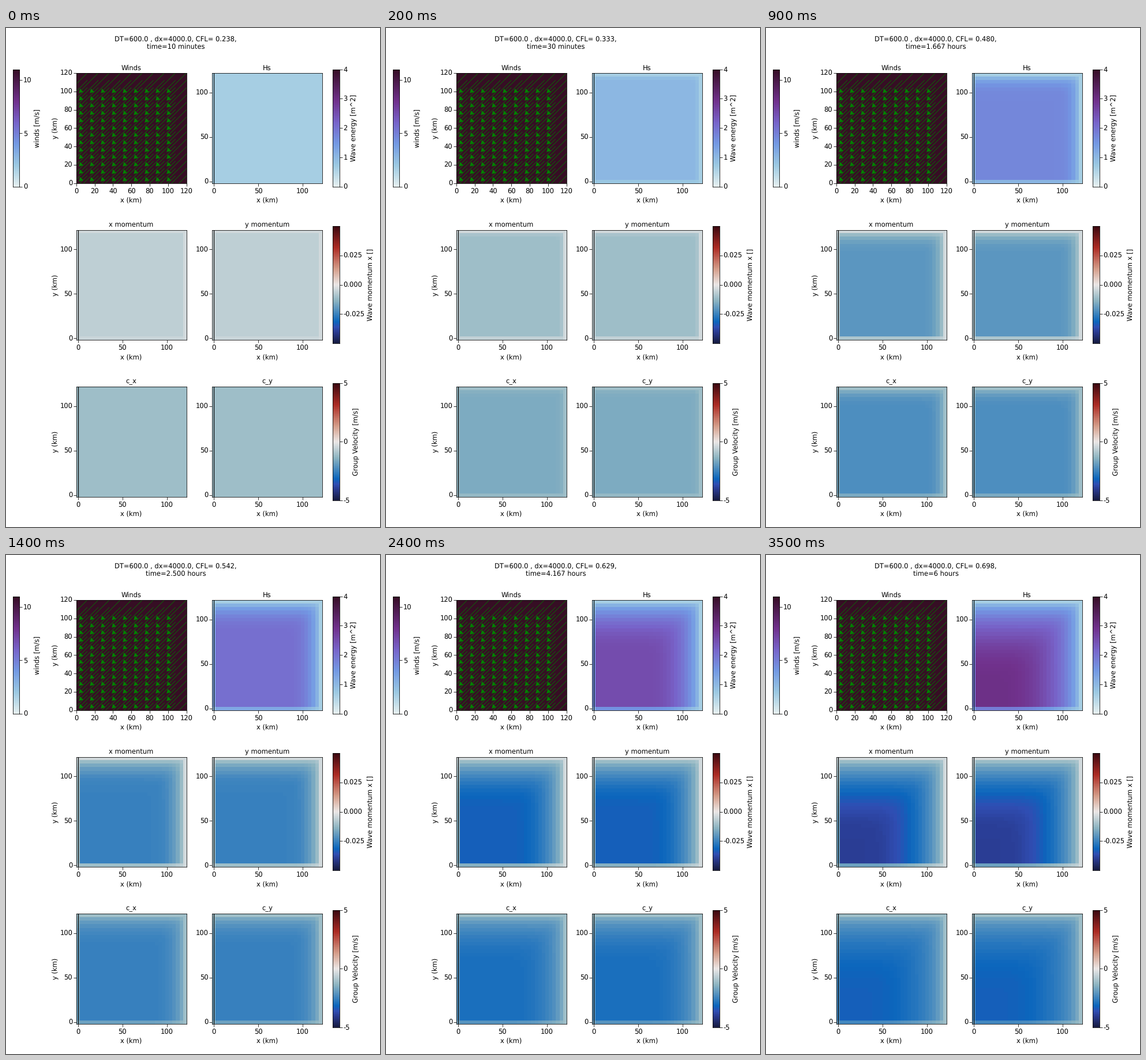
These frames come from a looping animation (648x864 px, 3600 ms). A matplotlib script:

```python
import numpy as np
import matplotlib.pyplot as plt
from matplotlib.animation import FuncAnimation
from matplotlib.colors import LinearSegmentedColormap

W, H, DPI = 648, 864, 72  # at 72 dpi one point is one pixel
STEPS, N = 36, 31
SIDE, ROW = 190.8, 271.5
LEFTS, TOP = (121.7, 357.2), 78

plt.rcParams.update({
    "font.family": "DejaVu Sans", "font.size": 11.5,
    "text.hinting": "no_hinting", "axes.linewidth": 0.8,
})


def cmap(name, stops):
    """Colour map from (position in elevenths, colour) pairs."""
    return LinearSegmentedColormap.from_list(
        name, [(p / 11, c) for p, c in stops])


DENSE = cmap("dense_like", [
    (0, "#e6f0f0"), (2, "#9cc9e2"), (4, "#739ae4"), (6, "#7864ca"),
    (8, "#71328d"), (11, "#360e24")])
BALANCE = cmap("balance_like", [
    (0, "#171c42"), (1, "#293a8f"), (1.5, "#304eb3"), (2, "#0b66bd"),
    (4, "#8eb5c2"), (5.5, "#ebe7e6"), (7, "#d59d89"), (9, "#ac2b24"),
    (11, "#3c0911")])


# Wave model: every cell has an age in time steps that sets its sea state.
GROWTH, DRIFT = 0.864, 0.88


def cfl(age):
    n = np.log(np.maximum(age, 1))
    return 0.2379 * np.exp(0.3076 * n - 0.0003 * n ** 3.5)


def age_of(energy):
    return energy ** (1 / GROWTH)


def step(energy):
    """Grow the inner cells, then push all energy down and to the left."""
    age = age_of(energy)
    age[1:-1, 1:-1] += 1
    a = DRIFT * cfl(age) / np.sqrt(2)
    g = age ** GROWTH
    g[0] = g[:, 0] = 0
    new = g * (1 - a) ** 2
    side = g * a * (1 - a)
    new[:, :-1] += side[:, 1:]
    new[:-1] += side[1:]
    new[:-1, :-1] += (g * a * a)[1:, 1:]
    new[0] = 1 + 0.8 * new[0]
    new[1:, 0] = 1 + 0.8 * new[1:, 0]
    new[-1] = new[:, -1] = 1
    return new


def simulate():
    states = [np.ones((N, N))]
    while len(states) < STEPS:
        states.append(step(states[-1]))
    return states


damp = np.ones((N, N))
damp[0] = damp[:, 0] = 0.8
damp[-1] = damp[:, -1] = 0.62


def fields(energy):
    age = age_of(energy)
    height = 0.63 * np.sqrt(energy)
    momentum = -0.0063 * age ** 0.515 * damp
    speed = -cfl(age) / 0.15 / np.sqrt(2)
    return height, momentum, momentum, speed, speed


fig = plt.figure(figsize=(W / DPI, H / DPI), dpi=DPI, facecolor="white")


def text(x, y, s, ha="center", rotation=0):
    return fig.text(x / W, 1 - y / H, s, ha=ha, va="baseline",
                    rotation=rotation, rotation_mode="anchor")


def axes(x, y, w, h):
    ax = fig.add_axes([x / W, 1 - (y + h) / H, w / W, h / H])
    ax.tick_params(length=5, width=0.8, labelbottom=False, labelleft=False,
                   labelright=False)
    return ax


def panel(col, row, title, lo, hi, ticks):
    x0, y0 = LEFTS[col], TOP + row * ROW
    ax = axes(x0, y0, SIDE, SIDE)
    ax.set(xlim=(lo, hi), ylim=(lo, hi), xticks=ticks, yticks=ticks)
    for v in ticks:
        off = (v - lo) / (hi - lo) * SIDE
        text(x0 + off, y0 + SIDE + 18, str(v))
        text(x0 - 6.5, y0 + SIDE - off + 4.2, str(v), ha="right")
    mid = x0 + SIDE / 2
    text(mid, y0 - 5.6, title)
    text(mid, y0 + SIDE + 33, "x (km)")
    if col == 0:
        text(88.5, y0 + SIDE / 2, "y (km)", rotation=90)
    return ax


def colorbar(x, row, cm, lo, hi, ticks, fmt, label, label_x):
    y0, h = 71.7 + row * ROW, 203
    ax = axes(x, y0, 12, h)
    ax.imshow(np.linspace(0, 1, 256)[:, None], cmap=cm, origin="lower",
              aspect="auto", extent=(0, 1, lo, hi))
    ax.set_xticks([])
    ax.yaxis.tick_right()
    ax.set_yticks(ticks)
    ax.tick_params(labelright=False)
    for v in ticks:
        y = y0 + h * (hi - v) / (hi - lo)
        text(x + 18.5, y + 4.2, format(v, fmt), ha="left")
    text(label_x, y0 + h / 2, label, rotation=90)


def winds():
    ax = panel(0, 0, "Winds", 0, 120, range(0, 121, 20))
    ax.set_facecolor(DENSE(1.0))
    x, y = (g.ravel() for g in np.meshgrid(np.arange(0, 121, 12),
                                           np.arange(0, 121, 8)))
    reach, tip = 20, 19.5
    ax.plot([x, x - reach], [y, y - reach], color="green", lw=0.7)
    ax.plot(x - tip, y - tip, ls="", marker=(3, 0, 135), ms=9.5,
            color="green", mew=0)


def heat(col, row, title, cm, lo, hi):
    ax = panel(col, row, title, -2, 122, (0, 50, 100))
    image = ax.imshow(np.zeros((N, N)), cmap=cm, vmin=lo, vmax=hi,
                      origin="lower", extent=(-2, 122, -2, 122),
                      interpolation="nearest", aspect="auto")
    ax.axvline(0, color="black", lw=1.2)
    return image


winds()
images = [
    heat(1, 0, "Hs", DENSE, 0, 4),
    heat(0, 1, "x momentum", BALANCE, -0.05, 0.05),
    heat(1, 1, "y momentum", BALANCE, -0.05, 0.05),
    heat(0, 2, "c_x", BALANCE, -5, 5),
    heat(1, 2, "c_y", BALANCE, -5, 5),
]
colorbar(11.5, 0, DENSE, 0, 11, (0, 5, 10), "d", "winds [m/s]", 57.5)
colorbar(565.8, 0, DENSE, 0, 4, range(5), "d", "Wave energy [m^2]", 605)
colorbar(565.8, 1, BALANCE, -0.05, 0.05, (-0.025, 0.0, 0.025), ".3f",
         "Wave momentum x []", 634.5)
colorbar(565.8, 2, BALANCE, -5, 5, (-5, 0, 5), "d",
         "Group Velocity [m/s]", 609)

head = text(294, 22.4, "")
clock = text(294.5, 36, "")
states = simulate()


def pretty(minutes):
    if minutes < 60:
        return f"{minutes} minutes"
    if minutes == 60:
        return "1 hour"
    hours = minutes / 60
    return f"{hours:.0f} hours" if minutes % 60 == 0 else f"{hours:.3f} hours"


def update(k):
    for image, data in zip(images, fields(states[k])):
        image.set_data(data)
    head.set_text(f"DT=600.0 , dx=4000.0, CFL= {cfl(k + 1):.3f},")
    clock.set_text(f"time={pretty(10 * (k + 1))}")
    return [*images, head, clock]


anim = FuncAnimation(fig, update, frames=STEPS, interval=100, repeat=True,
                     repeat_delay=0, blit=False)
plt.show()
```
